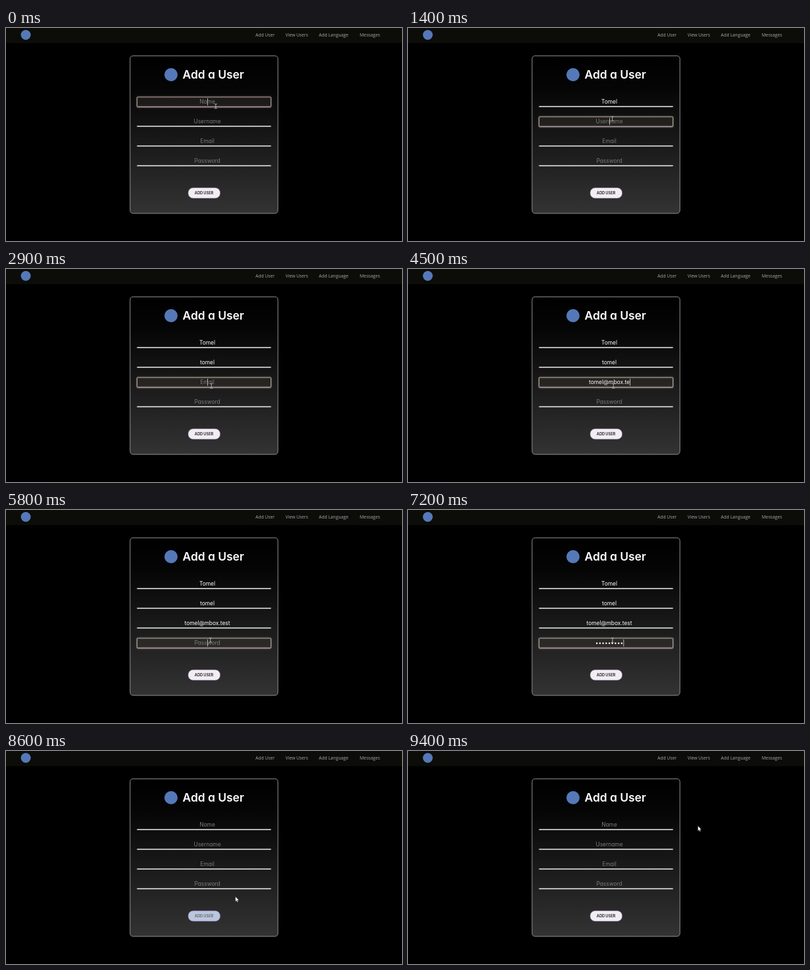
Recreate the animation shown at these times as an HTML page. Size 600x324 px, loop 9500 ms.

```html
<!DOCTYPE html>
<html lang="en">
<head>
<meta charset="utf-8">
<title>Add a User</title>
<style>
  html, body { margin: 0; width: 100%; height: 100%; overflow: hidden; background: #000; }
  svg { display: block; width: 100vw; height: 100vh; }
  text { font-family: Inter, "Open Sans", sans-serif; font-feature-settings: "cv11"; }
  .nav text { font: 6.75px "Open Sans", "Noto Sans", sans-serif; fill: #a6a6a4; }
  .title { font-size: 17.4px; font-weight: 600; fill: #fff; }
  .hint, .value { font-size: 8.4px; text-anchor: middle; }
  .hint { fill: #7b7b7b; }
  .value { fill: #fff; }
  .label { font-size: 5.6px; font-weight: 600; text-anchor: middle; }
  .glow { filter: drop-shadow(0 0 1.5px #b5a794aa); }
</style>
</head>
<body>
<svg id="stage" viewBox="0 0 600 324" preserveAspectRatio="none">
  <defs>
    <linearGradient id="panel" x2="0" y2="1">
      <stop offset="0" stop-color="#000"/>
      <stop offset=".2" stop-color="#050505"/>
      <stop offset="1" stop-color="#333"/>
    </linearGradient>
  </defs>
  <rect width="600" height="324"/>
  <rect width="600" height="23" fill="#0c0c09"/>
  <circle cx="30" cy="10.5" r="7.5" fill="#5579b8"/>
  <g class="nav">
    <text x="378" y="13.3">Add User</text>
    <text x="423.5" y="13.3">View Users</text>
    <text x="474" y="13.3">Add Language</text>
    <text x="536" y="13.3">Messages</text>
  </g>
  <rect x="188" y="42.3" width="224" height="239.7" rx="4.5" fill="url(#panel)" stroke="#919191"/>
  <circle cx="250" cy="71" r="10" fill="#5579b8"/>
  <text class="title" x="267.5" y="77">Add a User</text>
  <g id="fields"></g>
  <rect id="button" x="276" y="243" width="48.5" height="16" rx="7.5" stroke="#7c5a8c" stroke-width=".6"/>
  <text id="label" class="label" x="300" y="253.1">ADD USER</text>
  <g id="pointer">
    <path id="beam" d="M-2 -3.5Q-.4 -3.5 0 -2.9Q.4 -3.5 2 -3.5M0 -3V3M-2 3.5Q-.4 3.5 0 2.9Q.4 3.5 2 3.5" fill="none" stroke="#bbb" stroke-width=".9"/>
    <path id="arrow" d="M0 0V7.4L1.7 5.9L2.8 8.5L4 8L2.9 5.5H5.2Z" fill="#fff" stroke="#222" stroke-width=".3"/>
    <path id="hand" d="M-.7 0Q0 -.8 .7 0V2.7L3.2 3.5Q4 3.9 3.7 5L3 8H-1.2L-3.2 5Q-2.7 4 -.7 5.2Z" fill="#fff" stroke="#333" stroke-width=".4"/>
  </g>
</svg>
<script>
const LOOP = 9500, STEP = 100, CLEAR = 8000, MID = 305;
const $ = id => document.getElementById(id);

const every = (from, count) => Array.from({ length: count }, (_, i) => from + i * 100);

// keys: the time at which each character appears
const fields = [
  { hint: "Name", text: "Tomel", from: -500, to: 1300, edge: "#cdb5bb",
    keys: [300, 500, 700, 900, 1000] },
  { hint: "Username", text: "tomel", from: 1300, to: 2800, edge: "#c9c5ad",
    keys: [1800, 1900, 2000, 2000, 2200] },
  { hint: "Email", text: "tomel@mbox.test", from: 2800, to: 5400, edge: "#d0c6b0",
    keys: [3300, 3500, 3500, 3700, ...every(3700, 11)] },
  { hint: "Password", text: "•".repeat(9), from: 5400, to: 7900, edge: "#c6c0b8",
    keys: [6000, 6400, ...every(6600, 7)] }
];

// time, x, y of the pointer's hot spot
const path = [
  [0, 317.8, 119], [1100, 317.8, 119], [1400, 309.6, 138],
  [2500, 309.6, 138], [2900, 311.2, 178], [4900, 311.2, 178],
  [5200, 309.8, 198], [7400, 309.8, 198], [7900, 310.3, 247],
  [8400, 310.3, 247], [8800, 385, 196], [9100, 443, 146],
  [9400, 439.3, 114]
];

const clamp = v => Math.max(0, Math.min(1, v));
const ramp = (t, start, span) => clamp((t - start) / span);
const smooth = k => k * k * (3 - 2 * k);
const show = (el, on) => el.setAttribute("visibility", on ? "visible" : "hidden");

function add(parent, tag, attrs, text = "") {
  const el = document.createElementNS("http://www.w3.org/2000/svg", tag);
  for (const key in attrs) el.setAttribute(key, attrs[key]);
  el.textContent = text;
  return parent.appendChild(el);
}

fields.forEach((f, i) => {
  const g = add($("fields"), "g", { transform: `translate(0 ${i * 30})` });
  f.line = add(g, "path", { d: "M198.5 119.5H401.5", stroke: "#f2f2f2", "stroke-width": 1.3 });
  f.box = add(g, "g", { class: "glow" });
  add(f.box, "rect", { x: 198.5, y: 105, width: 203, height: 15, rx: 1,
    fill: "#000", "fill-opacity": .25, stroke: f.edge, "stroke-width": .9 });
  add(f.box, "path", { d: "M199 120H401", stroke: "#b193b0", "stroke-width": .9 });
  f.tip = add(g, "text", { class: "hint", x: MID, y: 115.2 }, f.hint);
  f.value = add(g, "text", { class: "value", x: MID, y: 115.2 });
  f.caret = add(g, "rect", { y: 106.8, width: .8, height: 10.8, fill: "#ddd" });
});

function drawField(f, t) {
  const typed = t < CLEAR ? f.keys.filter(k => k <= t).length : 0;
  const focus = ramp(t, f.from - 100, 200) * (1 - ramp(t, f.to - 100, 200));
  f.box.setAttribute("opacity", focus);
  f.line.setAttribute("opacity", 1 - focus);
  f.value.textContent = f.text.slice(0, typed);
  show(f.tip, !typed);
  const width = typed ? f.value.getComputedTextLength() : 0;
  f.caret.setAttribute("x", MID + width / 2 + .2);
  const blink = t >= 5500 && t < 5800;
  show(f.caret, t >= f.from && t < f.to && !blink);
}

function pointerAt(t) {
  let i = 0;
  while (i < path.length - 2 && path[i + 1][0] <= t) i++;
  const [t0, x0, y0] = path[i], [t1, x1, y1] = path[i + 1];
  const raw = ramp(t, t0, t1 - t0);
  const k = t0 < 8400 ? smooth(raw) : raw;
  return [x0 + (x1 - x0) * k, y0 + (y1 - y0) * k];
}

function drawPointer(t) {
  const [x, y] = pointerAt(t);
  const inside = x > 198 && x < 402;
  const onField = inside && y >= 105 && y < 211 && (y - 105) % 30 < 16;
  const onButton = x > 276 && x < 324.5 && y > 243 && y < 259;
  $("pointer").setAttribute("transform", `translate(${x} ${y})`);
  show($("beam"), onField);
  show($("hand"), onButton);
  show($("arrow"), !onField && !onButton);
}

function mix(a, b, k) {
  return `rgb(${a.map((v, i) => Math.round(v + (b[i] - v) * k))})`;
}

function drawButton(t) {
  const hover = ramp(t, 7700, 300) * (1 - ramp(t, 8400, 300));
  $("button").setAttribute("fill", mix([241, 238, 243], [75, 122, 184], hover));
  $("label").setAttribute("fill", mix([20, 18, 24], [255, 255, 255], hover));
}

const start = performance.now();
function frame() {
  const elapsed = (performance.now() - start) % LOOP;
  const t = Math.floor(elapsed / STEP) * STEP;
  fields.forEach(f => drawField(f, t));
  drawButton(t);
  drawPointer(t);
  requestAnimationFrame(frame);
}
frame();
</script>
</body>
</html>
```
